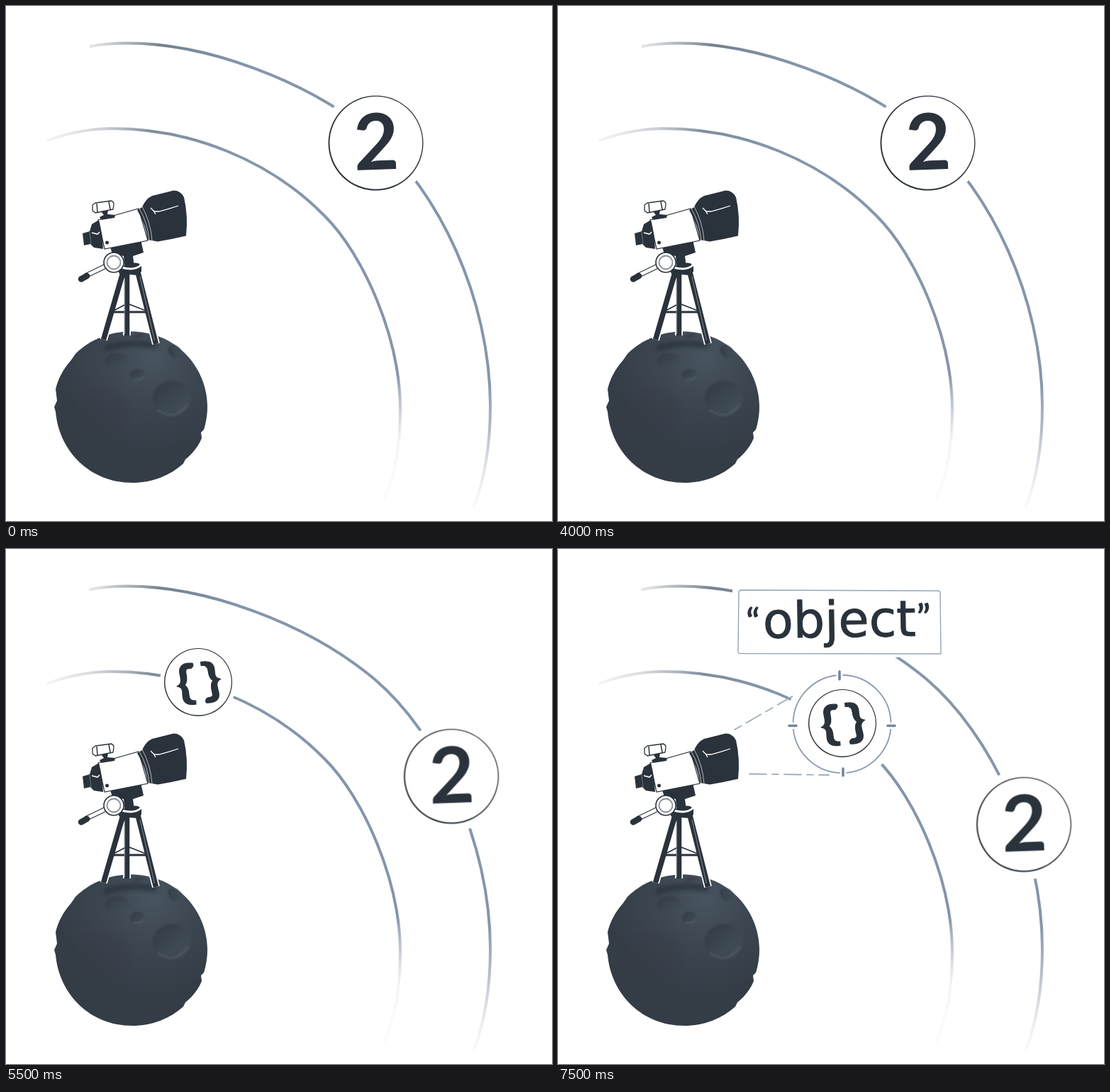
An HTML page for the animation above (8000 ms loop, 770 px wide and 727 px high).

```html
<!DOCTYPE html>
<html lang="en">
<head>
<meta charset="utf-8">
<title>Telescope</title>
<style>
  html, body { margin: 0; width: 100%; height: 100%; overflow: hidden; background: #fff; }
  svg { display: block; width: 100vw; height: 100vh; }
  .ink { fill: #2a323b; }
  .line { fill: none; stroke: #2a323b; }
  .white { fill: #fff; }
  .arc { fill: none; stroke-linecap: round; }
  .aim { fill: none; stroke: #8a9bb0; stroke-width: 1.8; }
  .beam { fill: none; stroke: #9eabba; stroke-width: 1.8; stroke-linecap: round; }
  .gap { stroke: #fff; stroke-width: 9; }
  .tick { stroke: #74869b; stroke-width: 3.6; stroke-linecap: round; }
  .box { fill: #fff; stroke: #98a5b5; stroke-width: 1.4; }
  text { font-family: Lato, sans-serif; fill: #2a323b; text-anchor: middle; }
  .digit { font-size: 110px; font-weight: 700; }
  .word { font-family: "DejaVu Sans", sans-serif; stroke: #2a323b; stroke-width: 1; stroke-linejoin: round; }
  .quote { font-size: 50px; font-weight: 700; }

  #two, #braces, #aimTwo, #aimBraces, #number, #object { animation: 8s step-end infinite; }
  #two { animation-name: two; }
  #braces { animation-name: braces; }
  #aimTwo { animation-name: aimTwo; }
  #aimBraces { animation-name: aimBraces; }
  #number { animation-name: number; }
  #object { animation-name: object; }

  @keyframes two {
    0% { transform: translate(521.5px, 193.5px); }
    56.25% { transform: translate(580px, 244px); }
    62.5% { transform: translate(604px, 284px); }
    68.75% { transform: translate(628px, 321px); }
    75% { transform: translate(643px, 348px); }
    81.25%, 100% { transform: translate(657px, 389px); }
  }
  @keyframes braces {
    0% { opacity: 0; transform: translate(113px, 177px); }
    56.25% { opacity: 1; transform: translate(113px, 177px); }
    62.5% { opacity: 1; transform: translate(196px, 175.5px); }
    68.75% { opacity: 1; transform: translate(271px, 188px); }
    75% { opacity: 1; transform: translate(346px, 218px); }
    81.25%, 100% { opacity: 1; transform: translate(401px, 246px); }
  }
  @keyframes aimTwo { 0% { opacity: 0; } 12.5% { opacity: 1; } 50%, 100% { opacity: 0; } }
  @keyframes number { 0% { opacity: 0; } 25% { opacity: 1; } 50%, 100% { opacity: 0; } }
  @keyframes aimBraces { 0% { opacity: 0; } 81.25%, 100% { opacity: 1; } }
  @keyframes object { 0% { opacity: 0; } 93.75%, 100% { opacity: 1; } }
</style>
</head>
<body>
<svg viewBox="0 0 770 727">
  <defs>
    <linearGradient id="outerFade" gradientUnits="userSpaceOnUse" x1="0" y1="0" x2="683" y2="683">
      <stop offset=".128" stop-color="#8a929b" stop-opacity=".2"/>
      <stop offset=".16" stop-color="#89929c" stop-opacity=".65"/>
      <stop offset=".2" stop-color="#74818f"/>
      <stop offset=".3" stop-color="#8596ab"/>
      <stop offset=".89" stop-color="#8596ab"/>
      <stop offset=".94" stop-color="#97a4b4" stop-opacity=".7"/>
      <stop offset="1" stop-color="#c3c8cf" stop-opacity=".1"/>
    </linearGradient>
    <linearGradient id="innerFade" gradientUnits="userSpaceOnUse" x1="0" y1="0" x2="616" y2="616">
      <stop offset=".2" stop-color="#9aa1aa" stop-opacity=".1"/>
      <stop offset=".24" stop-color="#9aa1aa" stop-opacity=".4"/>
      <stop offset=".31" stop-color="#808c9a"/>
      <stop offset=".4" stop-color="#8596ab"/>
      <stop offset=".87" stop-color="#8596ab"/>
      <stop offset=".92" stop-color="#9aa6b5" stop-opacity=".45"/>
      <stop offset=".95" stop-color="#b8c0ca" stop-opacity=".15"/>
      <stop offset="1" stop-color="#c3c8cf" stop-opacity=".06"/>
    </linearGradient>
    <radialGradient id="rock" cx=".64" cy=".16" r=".8">
      <stop offset="0" stop-color="#485460"/>
      <stop offset=".4" stop-color="#3c4650"/>
      <stop offset=".8" stop-color="#343d46"/>
    </radialGradient>
    <linearGradient id="crater" x1="0" y1="0" x2="1" y2="1">
      <stop offset="0" stop-color="#323b44"/>
      <stop offset="1" stop-color="#44505b"/>
    </linearGradient>
    <filter id="soft"><feGaussianBlur stdDeviation="3"/></filter>
    <filter id="dull"><feGaussianBlur stdDeviation=".9"/></filter>
    <path id="brace" d="M11-29C-3-31-9-26-8-16C-7-8-5-1-13 2C-4 4-6 10-6 16C-6 26 0 30 12 29V24C6 24 3 22 3 15C3 8 2 4-2 1C2-3 2-8 1-15C0-22 3-22 6-22C10-21 13-26 11-29Z"/>
  </defs>

  <!-- orbits -->
  <g class="arc" stroke-width="4">
    <path d="M119 57C136 53.500 153 52.500 170 52.500C280 52 425 104 520 184C609 260 683 412 683 565C683 620 675 667 660 708" stroke="url(#outerFade)"/>
    <path d="M58 190C90 178 120 173 150 173C260 173 372 217 450 297C503 350 557 468 556 573C556 620 549 660 533 697" stroke="url(#innerFade)"/>
  </g>

  <!-- sights -->
  <g id="aimTwo">
    <path d="M240 249L437 140L475 288L265 318Z" fill="#fff" opacity=".83"/>
    <circle class="white" cx="521.500" cy="194" r="93"/>
    <circle class="aim" cx="521.500" cy="194" r="86"/>
    <path class="gap" d="M517 102V115M523 273V286M428 197H442M600 196.500H614"/>
    <path class="tick" d="M517 101V114M523 273V285M428 197.500H441M600 196.500H615"/>
    <path class="beam" d="M250 251L437 147" stroke-dasharray="18 7 30 7 14 9 4 8"/>
    <path class="beam" d="M277 315L473 287" stroke-dasharray="24 8 9 9"/>
  </g>
  <g id="aimBraces">
    <circle class="white" cx="400.500" cy="247" r="80"/>
    <circle class="aim" cx="400.500" cy="247" r="69"/>
    <path class="gap" d="M397 173V185M402 309V321M326 249.500H338M464 249.500H476"/>
    <path class="tick" d="M397 173V184M402 310V320M326 249.500H336M465 249.500H475"/>
    <path class="beam" d="M249 255L332 207" stroke-dasharray="11 8 24 8"/>
    <path class="beam" d="M270 317.500L382 319" stroke-dasharray="24 8 9 8"/>
  </g>

  <!-- bodies -->
  <g id="two">
    <circle class="white" r="78"/>
    <circle class="ink" r="67"/>
    <circle class="white" r="65.400" cx=".3" cy="-.3"/>
    <text class="digit" x=".5" y="37.500" transform="rotate(-2)">2</text>
  </g>
  <g id="braces">
    <circle class="white" r="54"/>
    <circle class="ink" r="48"/>
    <circle class="white" r="46.700" cx=".1" cy="-.2"/>
    <g class="ink" stroke="#2a323b" stroke-width="1.2" stroke-linejoin="round">
      <use href="#brace" transform="translate(-17 3) rotate(-4)"/>
      <use href="#brace" transform="translate(19 -1) rotate(173)"/>
    </g>
  </g>

  <!-- labels -->
  <g id="number">
    <path class="white" d="M370 379H724V483H370Z"/>
    <path class="box" d="M379 387L714 388Q716 388 716 390L715 463Q715 465 713 465L379 465Q377 465 377 463L377.500 389Z"/>
    <text class="word" x="543" y="448" font-size="65">number</text>
    <text class="quote" x="404.500" y="440">“</text>
    <text class="quote" x="690" y="440">”</text>
  </g>
  <g id="object">
    <path class="white" d="M246 50H548V153H246Z"/>
    <path class="box" d="M257 58L536 59Q539 59 539 62L540 148L256 147.500Q254 147 254 145L255 60Z"/>
    <text class="word" x="397" y="124" font-size="70" transform="rotate(-.8 397 124)">object</text>
    <text class="quote" x="275" y="120">“</text>
    <text class="quote" x="515.500" y="114">”</text>
  </g>

  <!-- moon -->
  <path fill="url(#rock)" d="M176 459.500C205 459.500 232 470 251 489C272 509 284 537 284 566C284 577 282 589 279 598L275 602L276 610C271 622 263 632 253 640L250 646C231 663 206 673 178 673C119 673 75 629 70 573L68 566L72 557L70 541C73 527 81 512 91 501L98 491C118 471 146 459.500 176 459.500Z"/>
  <g filter="url(#soft)">
    <ellipse cx="135" cy="572" rx="38" ry="30" fill="#303942" opacity=".22"/>
    <path d="M138 484Q172 472 212 479" fill="none" stroke="#2b343d" stroke-width="8"/>
  </g>
  <g fill="url(#crater)" filter="url(#dull)">
    <ellipse cx="157" cy="502" rx="18" ry="12"/>
    <ellipse cx="186" cy="521" rx="11" ry="8.500"/>
    <ellipse cx="234" cy="554" rx="27" ry="25"/>
    <ellipse cx="238" cy="488" rx="8" ry="11" transform="rotate(-45 238 488)"/>
    <ellipse cx="190" cy="467" rx="10" ry="4"/>
    <path d="M214 570Q236 588 256 562M180 527Q190 530 195 522" fill="none" stroke="#515d68" stroke-width="1.6"/>
  </g>

  <!-- tripod -->
  <g fill="none">
    <path d="M165 376L137.500 471M170.500 378V465M186 376L211.500 477" stroke="#fff" stroke-width="11"/>
    <path class="line" d="M165 376L137.500 471M170.500 378V465M186 376L211.500 477" stroke-width="7.500"/>
    <path class="line" d="M150 432H199" stroke-width="3.200"/>
    <path class="line" d="M152 430L171 420L197 430" stroke-width="1.600"/>
    <path d="M167.500 384V463M189 382L209.500 472" stroke="#8e969f" stroke-width=".9"/>
  </g>

  <!-- mount -->
  <path class="ink" d="M146 337L190 330L194 348L179 353L180 361L191 364V375L185 380L160 378L158 373L167 366L166 353L150 350Z"/>
  <path d="M163 369Q181 374 190 366Q191 361 180 361" fill="none" stroke="#fff" stroke-width="3"/>
  <path class="line" d="M141 367L112 381" stroke-width="7"/>
  <path d="M141 367L114 380" stroke="#fff" stroke-width="4.800"/>
  <path class="line" d="M106 385.500L114 381" stroke-width="8.500" stroke-linecap="round"/>
  <circle cx="152" cy="362" r="14" fill="#fff" stroke="#2a323b" stroke-width="1.600"/>
  <circle cx="152" cy="362" r="9.500" fill="#fff" stroke="#858d96" stroke-width="1.800"/>

  <!-- tube -->
  <path class="white" stroke="#2a323b" stroke-width="1.200" d="M130 302L187 286L200 331L139 343Z"/>
  <path class="ink" d="M108 321L118 318L121 308L131 302Q136 321 137 343L124 341L119 336L110 338Z"/>
  <path d="M121 320L129 322L132 319" fill="none" stroke="#fff" stroke-width="1.600"/>
  <path d="M118 319L120 336" stroke="#7d858e" stroke-width=".8"/>
  <circle class="ink" cx="142.500" cy="334" r="2.500"/>
  <path class="ink" d="M185 288L192 284Q197 272 206 268L236 260.500Q246 260 251 270Q257 296 254 324.500Q235 329 214 332.500L200 330Q197 308 185 288Z"/>
  <path d="M188 286Q200 306 202 331M192 283Q204 305 206 331" fill="none" stroke="#c5cacf" stroke-width=".9"/>
  <path d="M204 285L209 290L216 290L230 286L243 282M208 289L211 294" fill="none" stroke="#fff" stroke-width="1.300"/>

  <!-- finder -->
  <path class="ink" d="M134 290L144 288L143 294L154 295L153 299L134 302L132 298L138 295Z"/>
  <path class="white" stroke="#2a323b" stroke-width="1.300" stroke-linejoin="round" d="M122 281L126 278L148 275Q152 276 152 280L151 287L126 292L122 289Z"/>
  <path class="line" d="M128 279L129 291M145 276L147 287" stroke-width="1.500"/>
</svg>
</body>
</html>
```
